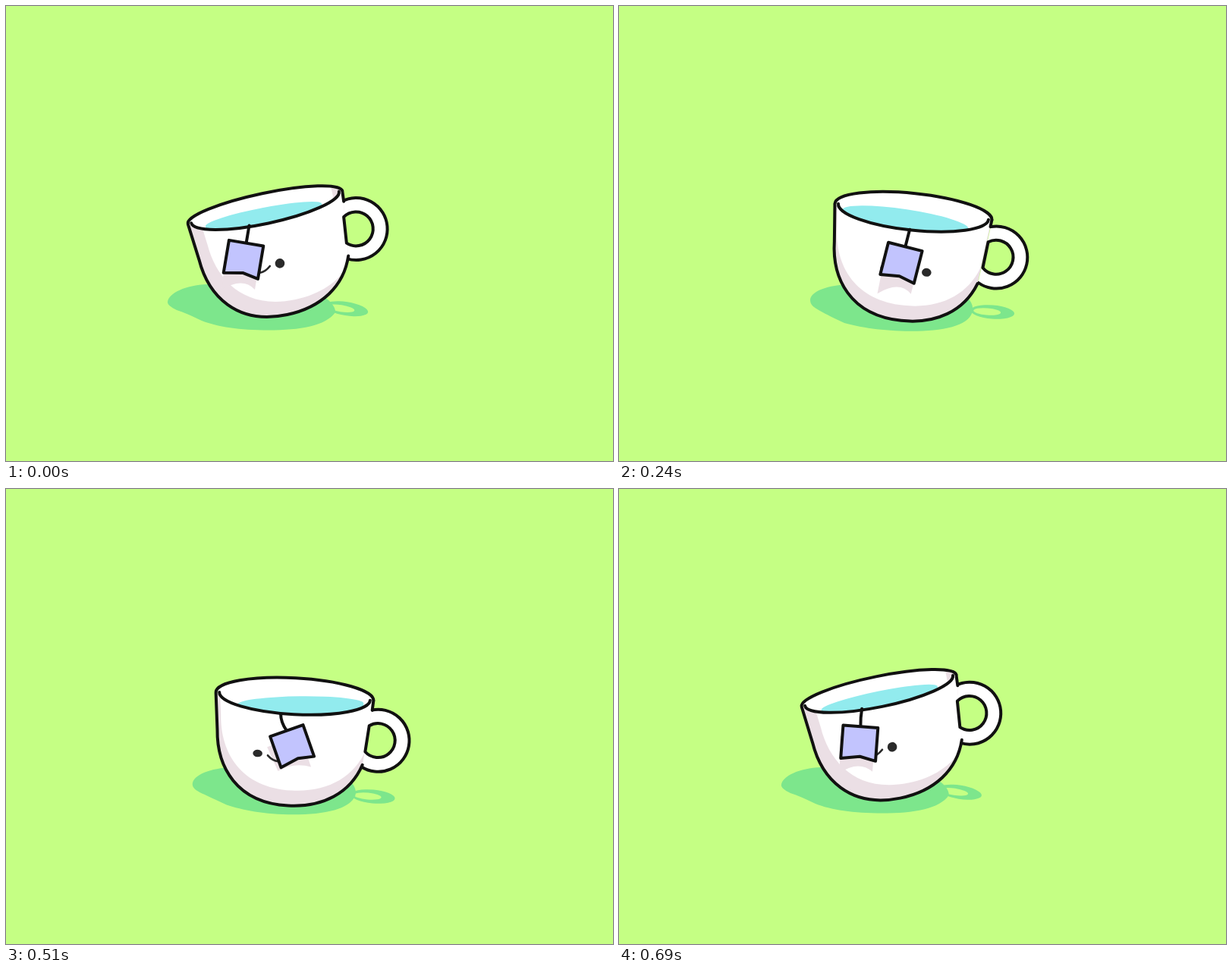
An HTML page with a canvas that plays this animation: 800x600 px, repeating every 0.72 s.

```html
<!DOCTYPE html>
<html lang="en">
<head>
<meta charset="utf-8">
<title>Rocking teacup</title>
<style>
html, body { margin: 0; width: 100%; height: 100%; overflow: hidden; background: #c5ff84; }
canvas { display: block; }
</style>
</head>
<body>
<canvas id="stage" width="800" height="600"></canvas>
<script>
const ctx = document.getElementById('stage').getContext('2d');
const LOOP = 720, STEP = 30, RAD = Math.PI / 180, TAU = Math.PI * 2;
const BG = '#c5ff84', SHADOW = '#7de68c', SHADE = '#ebdfe5', WHITE = '#fff';
const TEA = '#92ebee', TAG = '#c2c4fe', INK = '#111', FACE = '#2a2a2a';

// Cup parts, relative to the middle of the rim
const wall = 'M-104 1L-99.5 49.5C-97.5 98.5-69 144.5-1 144.5C45 144.5 80 123.5 94 85.5';
const bodyLine = new Path2D(wall);
const body = new Path2D(wall + 'L103 10L104 0Z');
const handle = new Path2D('M103 10.5A41 41 0 1 1 94 85.5');
const handleHole = new Path2D('M101.5 31A22.5 22.5 0 1 1 98 65.5Z');
const smile = new Path2D('M-14 2Q0 16 14 2');
const tag = new Path2D('M-23 0L23 0L23 44L2 39.5L-23 43.5Z');

function fill(path, color) {
  ctx.fillStyle = color;
  ctx.fill(path);
}

function stroke(path, width = 4, color = INK) {
  ctx.lineWidth = width;
  ctx.strokeStyle = color;
  ctx.stroke(path);
}

function ellipse(x, y, rx, ry, from = 0, to = TAU, tilt = 0) {
  const path = new Path2D();
  path.ellipse(x, y, rx, ry, tilt, from, to);
  return path;
}

// Draws with the origin moved and turned, then restores the state
function at(x, y, angle, draw) {
  ctx.save();
  ctx.translate(x, y);
  ctx.rotate(angle);
  draw();
  ctx.restore();
}

function drawShadow(p, s) {
  const right = 504 + 26.5 * p + 3.5 * (1 - p * p) + 1.5 * s;
  const y = 403 + 3.8 * p - 1.6 * s, tilt = (6 - 3 * p) * RAD;
  fill(ellipse(right - 29, y, 29, 9, 0, TAU, tilt), SHADOW);
  fill(ellipse(right - 36, y - 0.5, 18, 4.5, 0, TAU, tilt), BG);

  const q = Math.max(0, p), tip = 390.5 - 6 * q, low = 430 - 2.5 * Math.abs(p);
  at(239 + 26 * p, 0, 0, () => fill(new Path2D(
    `M0 ${tip}C1 ${tip - 12} 24 368 52 367L200 380` +
    `C212 386 ${218 - 4 * p} 396 ${216 - 5 * p} 404` +
    `C208 422 175 ${low} 133 ${low}C95 ${low} 65 ${423 + q} 45 ${415 + 6 * q}` +
    `C30 ${408 + 6 * q} 22 ${404 + 6 * q} 12 ${401 + q}C4 397 0 394 0 ${tip}Z`), SHADOW));
}

function drawTea(t, p, s, rim, cx, cy, angle) {
  const bump = (middle, size) => size * Math.max(0, 1 - ((t - middle) / 80) ** 2);
  ctx.save();
  ctx.translate(cx, cy);
  ctx.rotate(angle);
  ctx.clip(rim);
  ctx.rotate(-angle);
  at(-2 - 10 * s, 10, (11 * p + 3.5 * s) * RAD, () => {
    const rx = 82 + 4 * p;
    const surface = ellipse(0, 0, rx, 11 + 1.5 * p + 1.5 * s, Math.PI, TAU);
    surface.rect(-rx, -0.5, 2 * rx, 40);
    fill(surface, TEA);
  });
  fill(ellipse(-72.5, -0.5, bump(150, 7.8), bump(150, 7.8)), TEA);
  fill(ellipse(77.5, 11, bump(450, 10), bump(450, 9)), TEA);
  ctx.restore();
}

function drawFace(t, p, s) {
  const blink = Math.min(Math.abs(t - 185), Math.abs(t - 560));
  const open = Math.min(1, Math.max(0.23, (blink - 20) / 40));
  const back = Math.min(0, p);
  at(-13.2 + 10.5 * p + 7 * s, 77.8 + 3.9 * back, -5 * back * RAD, () => {
    for (const x of [-27.5, 27.5]) fill(ellipse(x, 0, 6.3, 6.3 * open), FACE);
    stroke(smile, 2.7, FACE);
  });
}

function draw(t) {
  const phase = t / LOOP * TAU;
  const p = -Math.cos(phase), s = Math.sin(phase);
  const angle = 12 * p * RAD;
  const lift = (p < 0 ? 10 : 8.5) * Math.abs(p);
  const cx = 372.5 + 31 * p, cy = 275.5 - lift;
  const onCup = paint => at(cx, cy, angle, paint);

  // The tag swings from the lip like a pendulum
  const swing = (1.5 + 21 * Math.sin(phase + Math.PI / 8)) * RAD;
  const hangX = cx - 14 + 7 * p + 6.5 * s, hangY = 298.5 - 0.9 * lift;
  const tagX = hangX - 23.5 * Math.sin(swing), tagY = hangY + 23.5 * Math.cos(swing);
  const tagShade = new Path2D(`M-23 0H23V44Q4 30-20 ${46 + 34 * Math.sin(swing)}Z`);

  const backRy = 23.8 + 2.2 * p - 3 * p * p, frontRy = 23.4 + 2 * p;
  const rim = ellipse(0, 0, 102, backRy, Math.PI, TAU);
  rim.ellipse(0, 0, 102, frontRy, 0, 0, Math.PI);
  const lag = 1.3 - 2.2 * p - 1.8 * s;
  const onHandle = paint => at(cx - 0.6 * lag, cy + lag, angle, paint);

  ctx.fillStyle = BG;
  ctx.fillRect(0, 0, 800, 600);
  ctx.lineCap = ctx.lineJoin = 'round';
  drawShadow(p, s);

  onHandle(() => {
    fill(handle, WHITE);
    stroke(handle);
  });

  // Body, with a lit copy of itself pushed up and sideways
  ctx.save();
  ctx.translate(cx, cy);
  ctx.rotate(angle);
  fill(body, SHADE);
  ctx.clip(body);
  ctx.rotate(-angle);
  at(6 - 5 * p, -20, angle, () => fill(body, WHITE));
  at(tagX - cx - 4, tagY - cy + 14, swing, () => fill(tagShade, SHADE));
  ctx.restore();

  onHandle(() => {
    fill(handleHole, BG);
    stroke(handleHole);
  });

  onCup(() => {
    stroke(bodyLine);
    stroke(new Path2D(`M104 0L103 ${10.5 + lag}`));
    fill(rim, WHITE);
    ctx.save();
    ctx.clip(rim);
    ctx.fillStyle = SHADE;
    ctx.fillRect(103.5 + 13 * Math.min(0, p), -30, 20, 60);
    ctx.restore();
  });
  drawTea(t, p, s, rim, cx, cy, angle);
  onCup(() => {
    stroke(ellipse(0, 0, 104, backRy, Math.PI, TAU));
    stroke(ellipse(0, 0, 99.5, frontRy, 0, Math.PI));
    drawFace(t, p, s);
  });

  const bendX = (hangX + tagX) / 2 + 4 * Math.min(0, s);
  stroke(new Path2D(`M${hangX} ${hangY}Q${bendX} ${(hangY + tagY) / 2} ${tagX} ${tagY}`));
  at(tagX, tagY, swing, () => {
    fill(tag, TAG);
    stroke(tag);
  });
}

function tick(now) {
  draw(Math.floor(now % LOOP / STEP) * STEP);
  requestAnimationFrame(tick);
}
tick(performance.now());
</script>
</body>
</html>
```
